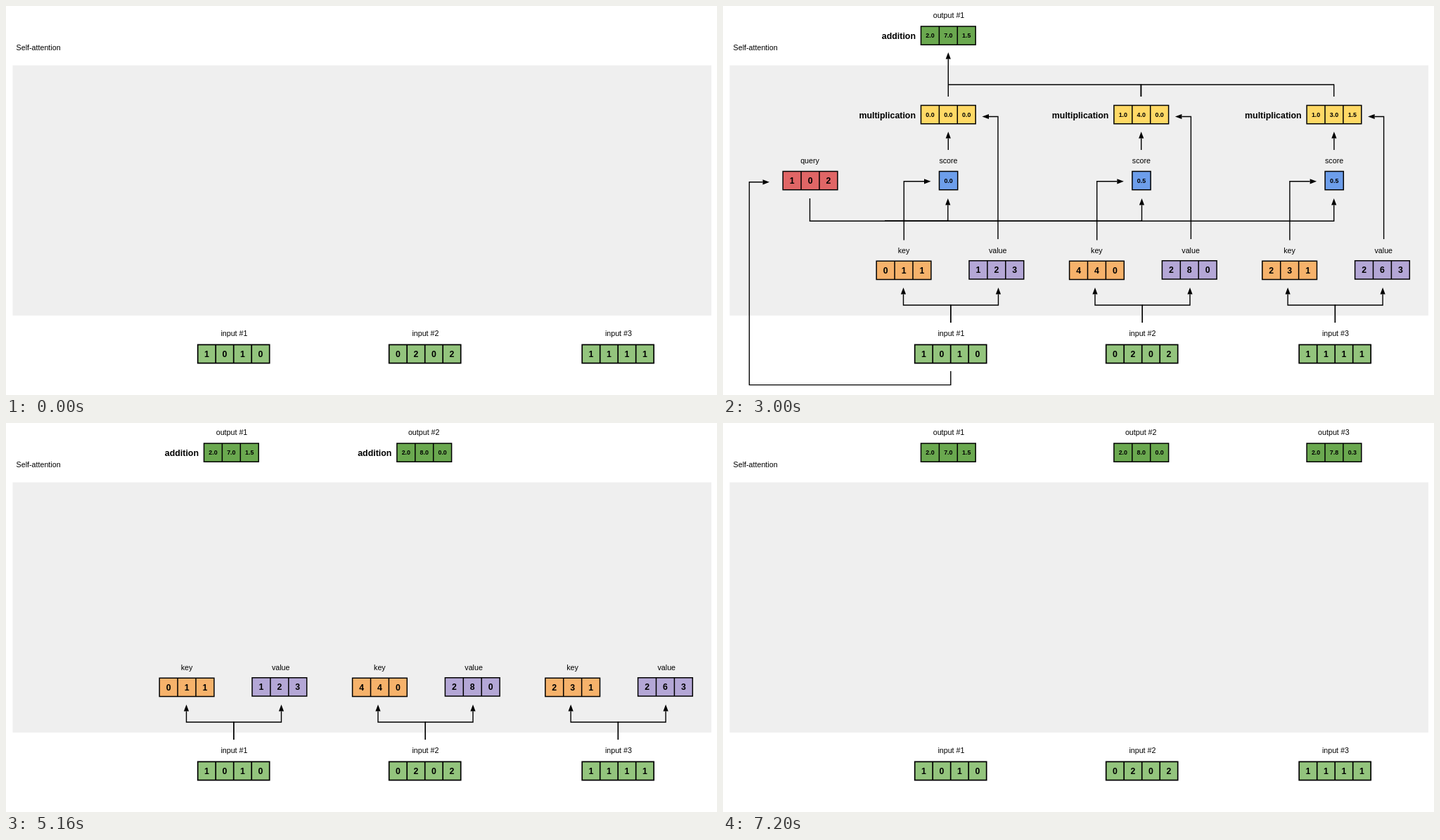
These frames come from a looping animation (1011x554 px, 7.56 s). An HTML page:

```html
<!DOCTYPE html>
<html lang="en">
<head>
<meta charset="utf-8">
<title>Self-attention</title>
<style>
  html, body { margin: 0; width: 100%; height: 100%; overflow: hidden; background: #fff; }
  svg { display: block; width: 100%; height: 100%; }
  text { font-family: "Liberation Sans", Arial, sans-serif; fill: #000; text-anchor: middle; }
  .label { font-size: 10.7px; }
  .big { font-size: 12.3px; font-weight: bold; }
  .small { font-size: 8.9px; font-weight: bold; }
  .op { font-size: 12.4px; font-weight: bold; text-anchor: end; }
  .wire { fill: none; stroke: #000; stroke-width: 1.4; }
</style>
</head>
<body>
<svg id="stage" viewBox="0 0 1011 554" xmlns="http://www.w3.org/2000/svg"></svg>
<script>
const LOOP = 7560, HOLD = 480, STEP = 120, END = 57, CYCLE = 17;
const stage = document.getElementById('stage');
const parts = [];

// Every part is visible while from <= step < to.
function add(tag, attrs, from = 0, to = Infinity, content = '') {
  const el = document.createElementNS('http://www.w3.org/2000/svg', tag);
  for (const name in attrs) el.setAttribute(name, attrs[name]);
  el.textContent = content;
  stage.appendChild(el);
  parts.push({ el, from, to });
}

function text(kind, x, y, content, from, to) {
  add('text', { class: kind, x, y }, from, to, content);
}

function boxes(x, y, count, cell, fill, from, to, weight = 1.5) {
  let d = `M${x} ${y}h${count * cell}v26.2h${-count * cell}z`;
  for (let i = 1; i < count; i++) d += `M${x + i * cell} ${y}v26.2`;
  add('path', { d, fill, stroke: '#000', 'stroke-width': weight }, from, to);
}

function values(kind, x, y, cell, list, from, to) {
  const base = y + (kind === 'big' ? 17.6 : 16.1);
  list.forEach((v, i) => text(kind, x + (i + 0.5) * cell, base, v, from, to));
}

function wire(points, from, to, weight = 1.4) {
  add('polyline', { class: 'wire', points: points.join(' '), style: `stroke-width:${weight}` }, from, to);
}

function arrow(points, from, to) {
  const [x, y] = points[points.length - 1];
  const [px, py] = points[points.length - 2];
  const dx = Math.sign(x - px), dy = Math.sign(y - py);
  const bx = x - 9.5 * dx, by = y - 9.5 * dy;
  wire([...points.slice(0, -1), [bx, by]], from, to);
  const head = [[x, y], [bx - 3.6 * dy, by + 3.6 * dx], [bx + 3.6 * dy, by - 3.6 * dx]];
  add('polygon', { points: head.join(' ') }, from, to);
}

const columns = [0, 274.4, 548.6];
const inputShift = [0, 272, 546.5];
const forkShift = [0, 272.5, 546.6];
const cell = 25.9;
const inputs = [[1, 0, 1, 0], [0, 2, 0, 2], [1, 1, 1, 1]];
const keys = [[0, 1, 1], [4, 4, 0], [2, 3, 1]];
const vals = [[1, 2, 3], [2, 8, 0], [2, 6, 3]];
const queries = [[1, 0, 2], [2, 2, 2], [2, 1, 3]];
const scores = [[0, 0.5, 0.5], [0, 1, 0], [0, 0.9, 0.1]];
const fixed = n => n.toFixed(1);

add('rect', { x: 9.5, y: 84.5, width: 993.5, height: 356.3, fill: '#efefef' });
add('text', { class: 'label', x: 14.6, y: 63.2, style: 'text-anchor:start' }, 0, Infinity, 'Self-attention');

inputs.forEach((row, i) => {
  const x = 272.7 + inputShift[i];
  text('label', 324.4 + inputShift[i], 469.8, `input #${i + 1}`);
  boxes(x, 482.4, 4, 25.5, '#93c47d', 0, Infinity, 1.7);
  values('big', x, 482.4, 25.5, row);
});

// Keys and values, one input after another
columns.forEach((dx, i) => {
  const from = 1 + 2 * i, f = forkShift[i];
  arrow([[323.8 + f, 451], [323.8 + f, 426], [256.5 + f, 426], [256.5 + f, 401]], from, END);
  arrow([[323.8 + f, 451], [323.8 + f, 426], [391.5 + f, 426], [391.5 + f, 401]], from, END);
  text('label', 257 + dx, 352.2, 'key', from, END);
  text('label', 390.7 + dx, 352.2, 'value', from, END);
  boxes(218.2 + dx, 363.3, 3, cell, '#f6b26b', from, END);
  boxes(350 + dx, 362.8, 3, cell, '#b4a7d6', from, END);
  values('big', 218.2 + dx, 363.3, cell, keys[i], from + 1, END);
  values('big', 350 + dx, 362.8, cell, vals[i], from + 1, END);
});

// One pass per query: scores, weighted values, sum
queries.forEach((query, q) => {
  const start = 7 + CYCLE * q, end = start + 16;
  const qx = 323.8 + [0, 273.2, 546.8][q];
  arrow([[qx, 520], [qx, 539.6], [37.4, 539.6], [37.4, 250.8], [66, 250.8]], start, end);
  text('label', 123.5, 223.8, 'query', start, end);
  boxes(85.2, 235.5, 3, cell, '#e06666', start, end);
  values('big', 85.2, 235.5, cell, query, start + 1, end);

  const sum = [0, 0, 0];
  columns.forEach((dx, i) => {
    const s = start + 2 + 2 * i;
    const tip = [319.8, 595.5, 868.7][i];
    const tail = i ? [[230, 306.3]] : [[123.5, 274], [123.5, 306.3]];
    arrow([...tail, [tip, 306.3], [tip, 274]], s, end);
    arrow([[257.3 + dx, 333.5], [257.3 + dx, 249.8], [295.5 + dx, 249.8]], s, end);
    text('label', 320.5 + dx, 223.8, 'score', s, end);
    boxes(307.5 + dx, 235.5, 1, 26.2, '#6d9eeb', s, end);
    values('small', 307.5 + dx, 235.5, 26.2, [fixed(scores[q][i])], s + 1, end);

    const m = start + 8 + 2 * i;
    const product = vals[i].map(v => v * scores[q][i]);
    product.forEach((v, k) => sum[k] += v);
    arrow([[320.3 + dx, 205], [320.3 + dx, 179]], m, end);
    arrow([[391 + dx, 332], [391 + dx, 157.5], [368.5 + dx, 157.5]], m, end);
    text('op', 274 + dx, 159.6, 'multiplication', m, end);
    boxes(281.5 + dx, 141.5, 3, cell, '#ffd966', m, end);
    values('small', 281.5 + dx, 141.5, cell, product.map(fixed), m + 1, end);
  });

  const a = start + 14, dx = columns[q];
  const ox = 320.3 + dx;
  arrow([[ox, 129], [ox, 66]], a, end);
  wire([[320.3, 112], [868.9, 112]], a, end);
  [320.3, 594.4, 868.7].forEach((x, i) => {
    if (i !== q) wire([[x, 129], [x, 111.4]], a, end, i === 1 ? 1.9 : 1.4);
  });
  text('label', 321 + dx - 1.2 * (q > 0), 17, `output #${q + 1}`, a);
  text('op', 274 + dx, 46.9, 'addition', a, END);
  boxes(281.5 + dx, 29, 3, cell, '#6aa84f', a);
  values('small', 281.5 + dx, 29, cell, sum.map(fixed), a + 1);
});

let shown = -1;
function draw(time) {
  const t = time % LOOP;
  const step = t < HOLD ? 0 : Math.min(END, Math.floor((t - HOLD) / STEP) + 1);
  if (step !== shown) {
    shown = step;
    for (const p of parts) {
      p.el.setAttribute('visibility', step >= p.from && step < p.to ? 'visible' : 'hidden');
    }
  }
}

const origin = performance.now();
function tick() {
  draw(performance.now() - origin);
  requestAnimationFrame(tick);
}
tick();
</script>
</body>
</html>
```
